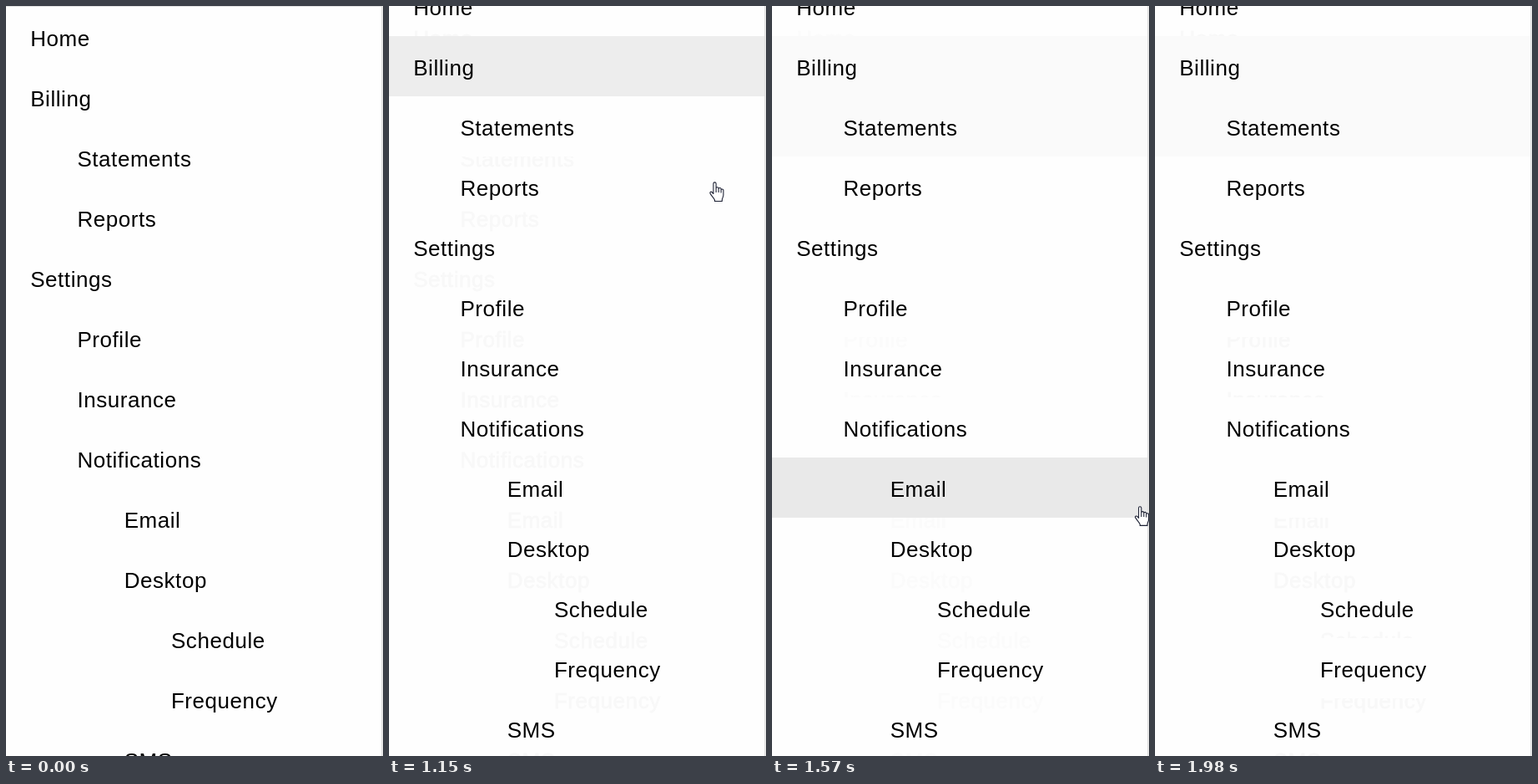
Animation, 452 px wide and 897 px high, one loop 4.07 s. Source, as an HTML page:

```html
<!DOCTYPE html>
<html lang="en">
<head>
<meta charset="utf-8">
<title>Nested menu</title>
<style>
  html, body { margin: 0; width: 100%; height: 100%; overflow: hidden; background: #fefefe; }
  svg { display: block; }
  text { font: 26px "Liberation Sans", Arial, sans-serif; letter-spacing: .55px; }
</style>
</head>
<body>
<svg id="stage" width="452" height="897" viewBox="0 0 452 897">
  <rect width="452" height="897" fill="#fefefe"/>
  <g id="trail" stroke-width=".8"></g>
  <g id="list">
    <g id="bands"></g>
    <rect width="451" height="1" fill="#e2e2e2"/>
    <g id="labels" fill="#000"></g>
  </g>
  <rect x="450" width="1.6" height="897" fill="#e0e0e0"/>
  <path id="hand" fill="#fff" stroke="#1c2033" stroke-width="1.1" stroke-linejoin="round"
    d="M5 14.5V2.4a1.6 1.6 0 0 1 3.2 0V9.5V8.2a1.5 1.5 0 0 1 3 0V10V9a1.5 1.5 0 0 1 3 0V11V10.3a1.4 1.4 0 0 1 2.8 0V16c0 2.5-1.6 4-1.6 6v1.5H6.6V22C5.6 19.5 2.6 17 1.2 14.2C.3 12.6 2 11.4 3.3 12.5Z M8.2 9.5V13M11.2 10V13M14.2 11V13.5"/>
</svg>
<script>
const LOOP = 4070, ROW = 72, SCROLL = 37, SCROLL_AT = 1150;
const ITEMS = [
  ['Home', 0], ['Billing', 0], ['Statements', 1], ['Reports', 1], ['Settings', 0],
  ['Profile', 1], ['Insurance', 1], ['Notifications', 1], ['Email', 2],
  ['Desktop', 2], ['Schedule', 3], ['Frequency', 3], ['SMS', 2]
];
const TICKS = [0, 950, 1000, 1050, 1100, 1150, 1200, 1240, 1290, 1340, 1380, 1420, 1470,
  1520, 1570, 1620, 1670, 1700, 1750, 1790, 1840, 1890, 1930, 1980];

// Row backgrounds by item: [time, colour]
const HOVER = '#ededed', CLEAR = '#fefefe';
const BANDS = {
  1: [[1050, HOVER], [1200, '#fafafa']],
  2: [[1150, CLEAR], [1200, HOVER], [1240, '#fafafa']],
  3: [[1240, HOVER], [1290, '#f9f9f9'], [1340, CLEAR]],
  4: [[1240, '#f4f4f4'], [1290, '#f9f9f9'], [1340, CLEAR]],
  5: [[1340, HOVER], [1380, CLEAR]],
  7: [[1420, HOVER], [1470, '#fcfcfc'], [1520, CLEAR]],
  8: [[1470, '#fcfcfc'], [1520, '#e9e9e9'], [1750, CLEAR]],
  11: [[1750, '#e9e9e9'], [1790, CLEAR]]
};
const TRAIL = [[SCROLL_AT, '#f8f8f8'], [1520, '#fbfbfb'], [1980, '#f8f8f8']];

// Pointer: time, x, y
const PATH = [[950, 442, 57], [1100, 386, 168], [1290, 400, 344],
  [1470, 429, 589], [1670, 442, 578], [1750, 470, 600]];

const $ = id => document.getElementById(id);
function add(parent, tag, attrs, text = '') {
  const el = document.createElementNS('http://www.w3.org/2000/svg', tag);
  for (const k in attrs) el.setAttribute(k, attrs[k]);
  el.textContent = text;
  return parent.appendChild(el);
}

ITEMS.forEach(([name, depth], i) => {
  const at = { x: 29.2 + 56.25 * depth, y: 48 + ROW * i };
  add($('trail'), 'text', at, name);
  add($('labels'), 'text', at, name);
});
const bands = Object.entries(BANDS).map(([i, steps]) => ({
  steps,
  el: add($('bands'), 'rect', { x: 0, y: 1 + ROW * i, width: 450, height: ROW })
}));

const held = (steps, t) => steps.reduce((v, [at, c]) => t >= at ? c : v, 'none');

function slope(i, k) {
  const a = PATH[Math.max(i - 1, 0)], b = PATH[Math.min(i + 1, PATH.length - 1)];
  return (b[k] - a[k]) / (b[0] - a[0]);
}
function along(t, k) {
  let i = 0;
  while (i < PATH.length - 2 && t >= PATH[i + 1][0]) i++;
  const a = PATH[i], b = PATH[i + 1], d = b[0] - a[0], u = (t - a[0]) / d;
  const s = u * u * (3 - 2 * u);
  return a[k] + (b[k] - a[k]) * s
    + d * u * (1 - u) * ((1 - u) * slope(i, k) - u * slope(i + 1, k));
}

function draw(time) {
  const t = TICKS.filter(v => v <= time).pop();
  const color = held(TRAIL, t);
  $('trail').setAttribute('fill', color);
  $('trail').setAttribute('stroke', color);
  $('list').setAttribute('transform', `translate(0 ${t >= SCROLL_AT ? -SCROLL : 0})`);
  bands.forEach(b => b.el.setAttribute('fill', held(b.steps, t)));
  const seen = t >= 950 && t < 1750;
  $('hand').setAttribute('visibility', seen ? 'visible' : 'hidden');
  if (seen) $('hand').setAttribute('transform', `translate(${along(t, 1)} ${along(t, 2)})`);
}

const start = performance.now();
function frame() {
  draw((performance.now() - start) % LOOP);
  requestAnimationFrame(frame);
}
frame();
</script>
</body>
</html>
```
